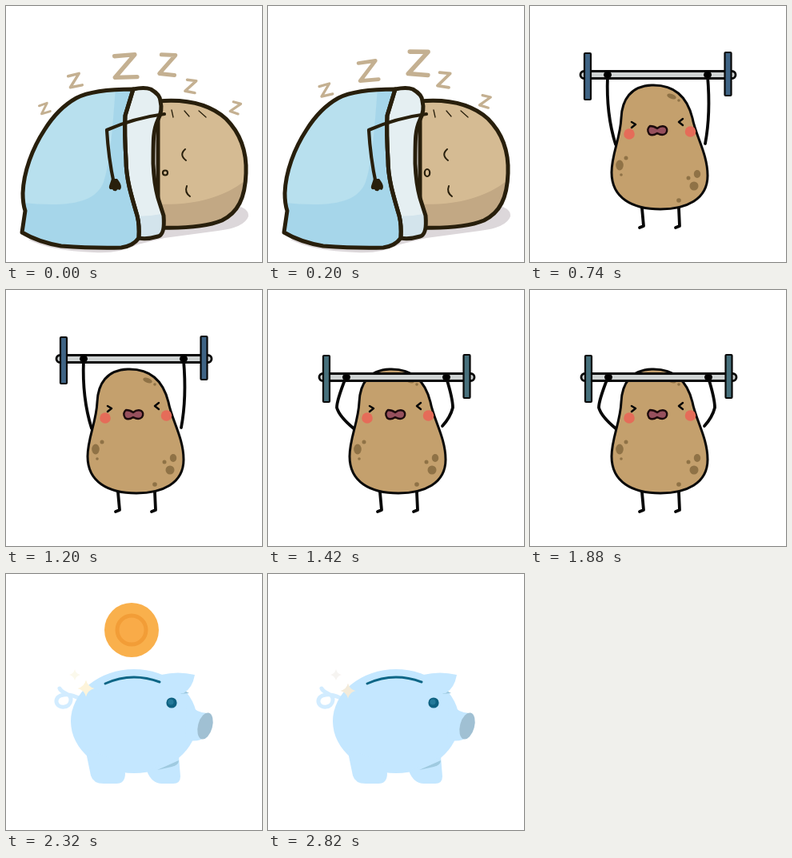
Write an HTML page that moves like this. It is 320 by 320 pixels and loops after 2.92 s.

```html
<!DOCTYPE html>
<html lang="en">
<head>
<meta charset="utf-8">
<title>Sleep, train, save</title>
<style>
html, body { margin: 0; width: 100%; height: 100%; overflow: hidden; background: #fff; }
svg { display: block; width: 100vw; height: 100vh; }
path, line { stroke-linecap: round; stroke-linejoin: round; }
.ink { stroke: #281f0c; fill: none; }
.black { stroke: #080808; fill: none; }
</style>
</head>
<body>
<svg viewBox="0 0 320 320">
  <defs>
    <path id="spud" d="M190 119C225 116 254 122 275 141C294 160 301 184 300 209C299 240 290 258 270 268C248 277 220 278 190 277Z"/>
    <path id="blanket" d="M159 104C138 104 107 105 88 115C70 125 58 139 48 155C33 178 22 207 21 234Q21 247 24 256L20 283Q40 295 69 300Q110 303 144 302Q159 300 166 290Q167 274 164 262C156 235 150 215 150 192Q148 160 149 137Z"/>
    <path id="cuff" d="M159 104Q173 101 181 104Q193 111 193 119Q196 131 190 142C184 155 184 165 184 197Q185 222 190 240L197 262Q199 286 190 288Q176 292 166 290Q167 274 164 262C156 235 150 215 150 192Q148 160 149 137Z"/>
    <clipPath id="inSpud"><use href="#spud"/></clipPath>
    <clipPath id="inBlanket"><use href="#blanket"/></clipPath>
    <clipPath id="inCuff"><use href="#cuff"/></clipPath>
    <clipPath id="aboveSlot"><path d="M0 0H320V136H193Q157 122 123 137H0Z"/></clipPath>
    <path id="star" d="M0 -10Q2 -2 10 0Q2 2 0 10Q-2 2 -10 0Q-2 -2 0 -10Z"/>
  </defs>

  <g id="sleep">
    <path fill="#dcd7da" d="M285 249Q304 252 303 263Q298 277 265 281L198 290L165 298Q140 310 110 308Q55 306 28 292L150 270Z"/>
    <use href="#spud" fill="#d5bb93"/>
    <path clip-path="url(#inSpud)" fill="#c2a884" d="M180 247C225 250 270 244 305 213V290H180Z"/>
    <use href="#spud" class="ink" stroke-width="5"/>
    <use href="#blanket" fill="#a6d6ea"/>
    <path clip-path="url(#inBlanket)" fill="#b8e0ee" d="M0 90H138C134 135 132 190 122 220C110 250 70 252 0 244Z"/>
    <use href="#cuff" fill="#e5eff2"/>
    <path clip-path="url(#inCuff)" fill="#d3e4ec" d="M145 262Q175 265 205 258V300H145Z"/>
    <use href="#blanket" class="ink" stroke-width="5"/>
    <use href="#cuff" class="ink" stroke-width="5"/>
    <path class="ink" stroke-width="4.2" d="M198 135Q160 140 126 155Q128 190 135 222"/>
    <path fill="#281f0c" d="M132 216L139 216Q147 226 142 230Q139 228 138 231Q134 232 133 229Q128 230 129 225Z"/>
    <path class="ink" stroke-width="1.3" d="M207 130L209 139M223 131L229 138M241 131L250 139"/>
    <path class="ink" stroke-width="2" d="M224 179Q216 186 225 193M226 225Q223 233 230 238"/>
    <ellipse id="mouth" class="ink" cx="199" cy="208.5" stroke-width="2.2"/>
    <g id="zs" fill="none" stroke="#c4b091"></g>
  </g>

  <g id="lift">
    <path id="arms" class="black" stroke-width="3.8"/>
    <path class="black" stroke-width="3.8" d="M140 253L142 275L137 277M186 253L187 275L182 277"/>
    <path fill="#c4a06d" stroke="#080808" stroke-width="3" d="M152 99C182 98 197 116 203 140C207 162 222 185 222 212C222 242 195 254 163 254C128 254 102 240 102 208C102 185 113 165 114 140C115 117 126 100 152 99Z"/>
    <g fill="#8f7246">
      <ellipse cx="177" cy="113" rx="6" ry="3" transform="rotate(20 177 113)"/>
      <circle cx="186" cy="118" r="1.8"/>
      <ellipse cx="112" cy="199" rx="4.8" ry="6.5"/>
      <circle cx="120" cy="190" r="2.5"/>
      <circle cx="114" cy="211" r="1.8"/>
      <ellipse cx="209" cy="210" rx="4.2" ry="5"/>
      <circle cx="205" cy="225" r="5.5"/>
      <circle cx="198" cy="215" r="2.5"/>
      <circle cx="186" cy="243" r="2.8"/>
    </g>
    <g fill="#e56c59"><circle cx="124" cy="160" r="6.8"/><circle cx="200.5" cy="157" r="6.8"/></g>
    <path class="black" stroke-width="2.5" d="M127 145L132 148L127 152M191 141L186 145L191 149"/>
    <path fill="#97505d" stroke="#1c0a0c" stroke-width="2.4" d="M150 150Q155 150 159 153Q164 149 169 151Q173 154 170 159Q166 163 159 159Q153 163 149 160Q145 154 150 150Z"/>
    <g id="bar" stroke="#080808">
      <rect x="63" y="81.5" width="194" height="9" rx="4.5" fill="#cfd3d3" stroke-width="2.8"/>
      <g id="plates" stroke-width="2.2">
        <rect x="68" y="59" width="8" height="58" rx="1"/>
        <rect x="243.5" y="58" width="8" height="54" rx="1"/>
      </g>
      <circle cx="97" cy="86" r="4.5"/><circle cx="222" cy="86" r="4.5"/>
    </g>
  </g>

  <g id="save">
    <path fill="none" stroke="#d2ecff" stroke-width="5" d="M67 143C70 150 82 149 81 158C80 168 65 169 63 160C62 150 78 147 94 157"/>
    <g fill="#c4e7ff">
      <ellipse cx="160" cy="184" rx="79" ry="65"/>
      <path d="M99 218L106 252Q109 262 122 262H138Q149 262 149 249L146 236Z"/>
      <path d="M176 246Q182 262 195 262H209Q218 262 218 253L216 228Z"/>
      <path d="M226 160Q238 174 252 174L244 207Q234 210 224 207Z"/>
    </g>
    <path fill="#9fcae0" d="M189 245L216 233Q216 239 207 241Z"/>
    <path fill="#9fcae0" d="M218 150L229 149L222 145Z"/>
    <path fill="#c4e7ff" d="M194 126Q215 121 236 126Q233 143 222 149Q207 152 194 143Z"/>
    <ellipse cx="249" cy="190" rx="9" ry="17" transform="rotate(15 249 190)" fill="#a0c0d3"/>
    <circle cx="207" cy="161" r="6.6" fill="#0e6181"/>
    <circle cx="206" cy="160" r="3.6" fill="#247a9a"/>
    <path fill="none" stroke="#0d6686" stroke-width="3" d="M124 137Q157 122 192 135"/>
    <use id="bigStar" href="#star"/>
    <use id="smallStar" href="#star"/>
    <g clip-path="url(#aboveSlot)">
      <g id="coin">
        <circle cx="157" r="34" fill="#f9b04c"/>
        <circle cx="157" r="18" fill="#f9ab48" stroke="#f29d37" stroke-width="5"/>
      </g>
    </g>
  </g>
</svg>
<script>
const $ = id => document.getElementById(id);
const set = (id, attrs) => {
  for (const k in attrs) $(id).setAttribute(k, attrs[k]);
};

const LOOP = 2920;
const sleepTimes = [0, 80, 200, 360, 540];
const liftTimes = [740, 960, 1200, 1420, 1660, 1880];
const SAVE = 2120;

// Each letter: centre x, centre y, width, height. Three poses move it one slot along the arc.
const poseA = [[48, 128, 12, 11], [86, 93, 16, 15], [149, 75, 29, 28], [202, 73, 20, 25], [231, 100, 13, 15], [287, 127, 11, 13]];
const poseB = [[58, 117, 14, 12], [101, 87, 20, 19], [174, 69, 32, 33], [209, 84, 17, 20], [256, 111, 13, 14]];
const poseC = poseB.map((z, i) => z.map((v, k) => (v + poseA[i + 1][k]) / 2));
const poses = [poseA, poseB, poseC];
const mouths = [[3, 3], [3.4, 6], [3.2, 4.5]];

const drawZ = ([x, y, w, h]) => {
  const a = w / 2, b = h / 2;
  return `<path transform="translate(${x} ${y}) rotate(${(x - 160) * 0.15})" stroke-width="${1.2 + h * 0.15}"
    d="M${-a * 0.9} ${-b * 0.9}L${a * 0.85} ${-b}L${-a * 0.9} ${b}H${a}"/>`;
};

const lastStep = (times, t) => times.filter(s => s <= t).length - 1;

function sleep(t) {
  const n = lastStep(sleepTimes, t) % 3;
  $("zs").innerHTML = poses[n].map(drawZ).join("");
  set("mouth", { rx: mouths[n][0], ry: mouths[n][1] });
}

function lift(t) {
  const down = lastStep(liftTimes, t) % 2;
  set("bar", { transform: down ? "translate(1 23)" : "" });
  set("plates", { fill: down ? "#47707c" : "#3f6485" });
  set("arms", { d: down
    ? "M97 110Q86 138 86 147Q89 158 107 173M223 110Q231 136 231 147Q228 159 218 170"
    : "M97 88Q95 135 107 173M222 88Q226 135 219 172" });
}

function save(t) {
  const n = Math.floor((t - SAVE) / 100);
  set("coin", { transform: `translate(0 ${46 + 6 * n * n})` });
  const p = Math.min(1, Math.max(0, (n - 2) / 5));
  set("bigStar", { transform: `translate(100 ${143 + 3 * p}) scale(${1.05 - 0.1 * p})`, fill: p < 0.5 ? "#fdf4da" : "#f3ebda" });
  set("smallStar", { transform: `translate(${86 - p} 126) scale(.7)`, fill: p < 0.5 ? "#fbf9ec" : "#f6f4f1" });
}

const scenes = { sleep, lift, save };

function frame(now) {
  const t = now % LOOP;
  const name = t < liftTimes[0] ? "sleep" : t < SAVE ? "lift" : "save";
  for (const id in scenes) $(id).style.display = id === name ? "" : "none";
  scenes[name](t);
  requestAnimationFrame(frame);
}
frame(0);
</script>
</body>
</html>
```
